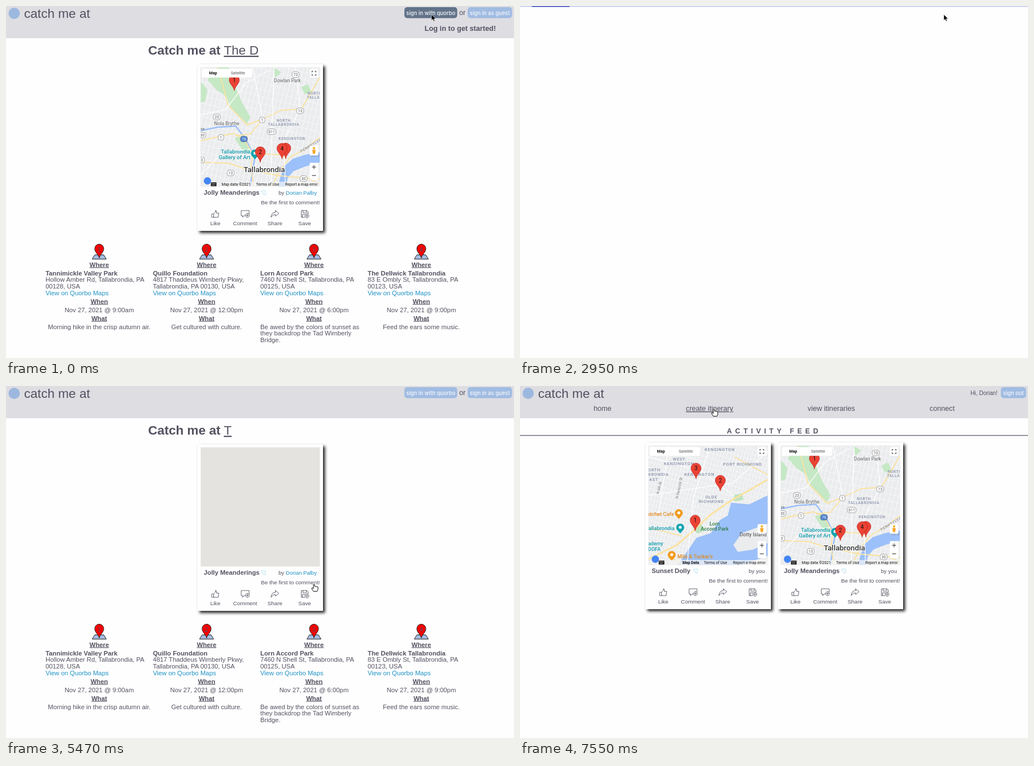
An HTML page that plays this animation: 899x623 px, repeating every 8 s.

```html
<!DOCTYPE html>
<html lang="en">
<head>
<meta charset="utf-8">
<title>catch me at</title>
<style>
html, body { margin: 0; width: 100%; height: 100%; overflow: hidden; background: #fefefe; }
svg { display: block; width: 899px; height: 623px; font-family: "Liberation Sans", Arial, sans-serif; fill: #545160; }
text { white-space: pre; }
.b { font-weight: 700; }
.med { font-weight: 500; }
.mid { text-anchor: middle; }
.end { text-anchor: end; }
.u { text-decoration: underline; }
.link { fill: #1f92c5; }
.ui { font-family: Inter, sans-serif; font-weight: 500; fill: #f6f8fc; text-anchor: middle; }
.rob { font-family: Roboto, sans-serif; }
.area { font-family: Roboto, sans-serif; fill: #8791a9; font-weight: 500; letter-spacing: .7px; }
.icon { fill: none; stroke: #555260; stroke-width: .9; stroke-linejoin: round; stroke-linecap: round; }
.hwy { fill: none; stroke: #fae3a0; stroke-linejoin: round; }
.road { fill: none; stroke: #fff; stroke-width: 1.3; }
.water { fill: #9cc0f9; }
</style>
</head>
<body>
<svg id="stage" viewBox="0 0 899 623" xmlns="http://www.w3.org/2000/svg"></svg>
<script>
const txt = (x, y, s, size = 11.3, cls = '', attr = '') =>
  `<text x="${x}" y="${y}" font-size="${size}" class="${cls}" ${attr}>${s}</text>`;
const rect = (x, y, w, h, fill, attr = '') =>
  `<rect x="${x}" y="${y}" width="${w}" height="${h}" fill="${fill}" ${attr}/>`;
const dot = (x, y, r, fill) => `<circle cx="${x}" cy="${y}" r="${r}" fill="${fill}"/>`;
const path = (d, attr = '') => `<path d="${d}" ${attr}/>`;
const at = (x, y, body, attr = '') => `<g transform="translate(${x} ${y})" ${attr}>${body}</g>`;
const hline = (x1, x2, y, color) => path(`M${x1} ${y}H${x2}`, `stroke="${color}"`);

const LIGHT = '#a1bce2', SLATE = '#627389';
const button = (x, w, label, id = '') =>
  rect(x, 2, w, 19.5, LIGHT, `rx="5" ${id && `id="${id}"`}`) + txt(x + w / 2, 15.5, label, 9.5, 'ui');

// Map parts, in map coordinates (211 x 211)
const LAND = '#ebecee';
const mapPin = (x, y, n) => at(x, y,
  path('M0 19C-1 11-9 7-9 0A9 9 0 0 1 9 0C9 7 1 11 0 19Z', 'fill="#ea4335" stroke="#b31412" stroke-width=".6"') +
  txt(0, 3.6, n, 10, 'rob mid', 'fill="#111"'));
const spot = (x, y, fill) => at(x, y,
  path('M0 11L-6 4A7 7 0 1 1 6 4Z', `fill="${fill}"`) + dot(0, 0, 2.6, '#fff'));
const shield = (x, y, n, fill = '#fff', ink = '#555') => {
  const w = 7 + String(n).length * 2.8;
  return rect(x - w / 2, y - 5, w, 10, fill, 'rx="4" stroke="#8b8b8b" stroke-width=".8"') +
    txt(x, y + 2.4, n, 6.8, 'rob mid', `fill="${ink}"`);
};
const streets = (id, size, angle) =>
  `<pattern id="${id}" width="${size}" height="${size * 1.5}" patternUnits="userSpaceOnUse" patternTransform="rotate(${angle})">` +
  path(`M0 0H${size}M0 0V${size * 1.5}`, 'stroke="#fff" stroke-width="1.2"') + '</pattern>';

const controls = (credit, creditX, cls) =>
  rect(2, 2.5, 89, 15.5, '#fff', 'rx="1.5"') +
  txt(22, 12.8, 'Map', 7, 'rob mid b', 'fill="#111"') + txt(66, 12.8, 'Satellite', 7, 'rob mid', 'fill="#555"') +
  rect(193, 3, 15, 15, '#fff', 'rx="1.5"') +
  path('M197 9V7H199M202 7H204V9M204 12V14H202M199 14H197V12', 'fill="none" stroke="#666" stroke-width="1.3"') +
  rect(193, 139, 15, 17, '#fff', 'rx="1.5"') + dot(200.5, 143, 2.2, '#f6b73c') +
  path('M197.5 146H203.5L202.5 153H198.5Z', 'fill="#f6a623"') +
  rect(193, 169, 15, 30, '#fff', 'rx="1.5"') +
  path('M197 176.5H204M200.5 173V180M197 191.5H204', 'stroke="#666" stroke-width="1.4"') +
  dot(12, 201, 6.5, '#4285f4') +
  rect(36, 202.5, 175, 8.5, '#f5f5f5', 'opacity=".7"') +
  rect(18, 203.5, 10, 7, '#222', 'rx="1"') +
  path('M19.5 205.5H26.5M20.5 208.5H25.5', 'stroke="#fff" stroke-dasharray="1 .7"') +
  txt(creditX, 209.5, credit, 6.9, 'rob ' + cls, 'fill="#111"') +
  txt(98, 209.5, 'Terms of Use', 6.9, 'rob', 'fill="#111"') +
  txt(207, 209.5, 'Report a map error', 6.9, 'rob end', 'fill="#111"');

const cityMap = () =>
  rect(0, 0, 211, 211, LAND) + rect(0, 0, 211, 211, 'url(#blocks)') +
  path('M12 22L30 0H50L63 38 73 62 88 88 82 100 66 84 54 74 46 52 28 40ZM0 25L12 40 8 60 0 63ZM128 0L143 9 132 18ZM60 125L78 120 90 146 76 150ZM178 35L190 30 196 44 184 48Z', 'fill="#c5e8c5"') +
  path('M0 112L30 106 62 104 80 128 88 144 96 158 93 176 88 211', 'fill="none" stroke="#9cc0f9" stroke-width="2.5"') +
  path('M211 150L184 155 163 162 148 175 141 194 137 211H151L154 196 164 184 184 176 211 168Z', 'class="water"') +
  path('M0 130L34 122 58 117 76 126 92 153 89 178 94 211M126 211L140 182 160 158 186 144 211 124M92 152L140 155 152 162M30 0L41 38 48 66 82 102 109 92 143 76 178 74 211 18M0 168L50 170 80 180 140 192 211 198M109 92L88 118 62 121M211 206L180 192', 'class="hwy" stroke-width="1.9"') +
  path('M0 84L44 75 80 28 120 6M125 211L126 113 130 0M150 211L147 130 176 74 168 0M92 0L110 92M0 190L40 150 88 145', 'class="road"') +
  txt(153.5, 26.5, 'Dowlan Park', 8.6, 'rob mid', 'fill="#6b6b6b"') +
  txt(189, 48, 'NORTH', 6.5, 'area') + txt(188, 55, 'TALLABRONDIA', 6.5, 'area') +
  txt(147, 96.5, 'NORTH', 6.5, 'area mid') + txt(147, 103.5, 'TALLABRONDIA', 6.5, 'area mid') +
  txt(161.5, 128, 'KENSINGTON', 6.5, 'area mid') +
  txt(46, 102.5, 'Nola Brythe', 8.6, 'rob mid', 'fill="#6b6b6b"') +
  txt(0, 111, 're', 8, 'rob', 'fill="#6b6b6b"') +
  txt(0, 0, 'PENNSYLVANIA', 6.5, 'area', 'transform="translate(178 151) rotate(-31)"') +
  txt(195, 158, 'NEW', 6.5, 'area') +
  shield(168, 13, 73) + shield(176, 77, 13) + shield(28.5, 88, 23) + shield(109, 93, 1) + shield(125.5, 114, 611) +
  shield(36, 124, 1) + shield(76.5, 127, 76, '#4a7fcb', '#fff') + shield(3, 120, 30) + shield(53, 187, 13) +
  shield(2, 164, 3) + shield(182, 197, 30) +
  txt(88, 152.5, 'Tallabrondia', 9.5, 'rob end med', 'fill="#129eaf"') +
  txt(88, 162, 'Gallery of Art', 9.5, 'rob end med', 'fill="#129eaf"') + spot(96, 152, '#12a4af') +
  txt(112.5, 185.5, 'Tallabrondia', 13.3, 'rob mid med', 'fill="#333" stroke="#fff" stroke-width="2" paint-order="stroke"') +
  mapPin(59.5, 22.5, 1) + mapPin(105.5, 149.5, 2) + mapPin(150.5, 143, '') + mapPin(144, 143.5, 4) +
  controls('Map data ©2021', 37, '');

const townMap = () =>
  rect(0, 0, 211, 211, LAND) + rect(0, 0, 211, 211, 'url(#lanes)') +
  path('M52 211L85 163 110 155 126 132 140 124 146 101 178 104 211 88V195L165 211Z', 'class="water"') +
  path('M211 138L165 155 150 176 158 188 185 184 211 172Z', `fill="${LAND}"`) +
  path('M80 145L92 136 100 150 86 156ZM150 88L166 84 168 96 152 99Z', 'fill="#bfe3c0"') +
  path('M0 201L50 176 82 148 110 122 145 98 211 60', 'class="hwy" stroke-width="3"') +
  path('M0 145L60 160M152 20L211 52M36 195L60 211', 'class="hwy" stroke-width="1.9"') +
  path('M0 88L150 66 211 10M68 211L80 90 110 0M36 0L18 120M0 20L96 46 152 90', 'class="road"') +
  txt(126, 9.5, 'KENSINGTON', 7.5, 'area mid') +
  txt(54, 26, 'WEST', 7.5, 'area mid') + txt(54, 34.5, 'KENSINGTON', 7.5, 'area mid') +
  txt(132, 35.5, 'PORT RICHMOND', 7.5, 'area') + txt(90, 53.5, 'KENSINGTON', 7.5, 'area mid') +
  txt(-1, 45.5, 'ORTH', 7.5, 'area') + txt(-1, 53.5, 'BRONDIA', 7.5, 'area') + txt(1, 62, 'AST', 7.5, 'area') +
  txt(111, 93.5, 'OLDE', 7.5, 'area mid') + txt(111, 101.5, 'RICHMOND', 7.5, 'area mid') +
  txt(0, 0, 'N 6th St', 6.3, 'rob', 'transform="translate(18 86) rotate(-76)" fill="#777"') +
  txt(0, 0, 'N Hancock St', 6.3, 'rob', 'transform="translate(52 94) rotate(-78)" fill="#777"') +
  txt(45, 124, 'Hatchet Cafe', 9.3, 'rob end med', 'fill="#e08a1e"') + spot(53.5, 119, '#f29b1d') +
  txt(46, 149.5, 'Tallabrondia', 9.3, 'rob end med', 'fill="#129eaf"') + spot(56, 144.5, '#12a4af') +
  txt(117, 141, 'Lorn', 9, 'rob mid med', 'fill="#2f7d4a"') + txt(117, 150.5, 'Accord Park', 9, 'rob mid med', 'fill="#2f7d4a"') +
  txt(185, 160.5, 'Dotty Island', 9, 'rob mid', 'fill="#444"') +
  txt(-1, 176, 'ademy', 9, 'rob med', 'fill="#129eaf"') + txt(-1, 186, 'DOFA', 9, 'rob med', 'fill="#129eaf"') +
  spot(41, 193, '#f29b1d') + txt(51, 199.5, 'Milo &amp; Tucker\'s', 9.3, 'rob med', 'fill="#e08a1e"') +
  mapPin(84, 40, 3) + mapPin(127, 61.5, 2) + mapPin(82.5, 132, 1) +
  controls('Map Data', 60, 'b');

const actions = [
  ['Like', 'M-6 0H-3V6H-6ZM-3 0L0-3V-6Q2-7 2-4V-1.5H6L5 6H-3'],
  ['Comment', 'M0 3H-2L-4.5 6V3H-7V-6H7V0M4-1A3.5 3.5 0 1 0 4.1-1M4 .8V4.2M2.3 2.5H5.7'],
  ['Share', 'M1-6L7-1 1 4V1Q-4 1-7 6Q-6-3 1-3Z'],
  ['Save', 'M0 6H-6V-6H4L6-4V0M-3-6V-2H3V-6M-4 6V1H1M4 0A3.5 3.5 0 1 0 4.1 0M4 1.8V5.2M2.3 3.5H5.7']
];
const card = (x, y, title, tagX, by, map) => at(x, y,
  rect(0, 0, 222, 295, '#fefefe', 'filter="url(#shadow)"') + rect(5.5, 5.5, 211, 211, '#e4e3df') +
  at(5.5, 5.5, map, 'class="map" clip-path="url(#mapClip)"') +
  txt(11, 231, title, 11.3, 'b') +
  path(`M${tagX} 224H${tagX + 7}V231H${tagX + 4}L${tagX + 3} 228 ${tagX} 226Z`, 'fill="none" stroke="#a9dbef" stroke-width=".8"') +
  txt(211, 230.5, by, 9.6, 'end') + txt(216.5, 247.5, 'Be the first to comment!', 9.9, 'end') +
  actions.map(([label, d], i) => at(31.5 + i * 52.7, 265, path(d, 'class="icon"') + txt(0, 20, label, 9.9, 'mid'))).join(''));

const stops = [
  ['Tannimickle Valley Park', 'Hollow Amber Rd, Tallabrondia, PA', '00128, USA', '9:00am', ['Morning hike in the crisp autumn air.']],
  ['Quillo Foundation', '4817 Thaddeus Wimberly Pkwy,', 'Tallabrondia, PA 00130, USA', '12:00pm', ['Get cultured with culture.']],
  ['Lorn Accord Park', '7460 N Shell St, Tallabrondia, PA', '00125, USA', '6:00pm',
    ['Be awed by the colors of sunset as', 'they backdrop the Tad Wimberly', 'Bridge.']],
  ['The Dellwick Tallabrondia', '83 E Ombly St, Tallabrondia, PA', '00123, USA', '9:00pm', ['Feed the ears some music.']]
];
const stop = ([name, street, zip, time, what], i) => at(70 + i * 190, 0,
  path('M82.5 448L87 440.5H103L107.5 448Z', 'fill="#a5bce2" stroke="#222"') +
  path('M95 446C94 440 87 436 87 429.5A8 8 0 0 1 103 429.5C103 436 96 440 95 446Z', 'fill="#f70000" stroke="#222"') +
  txt(95, 434.5, i + 1, 11.3, 'mid') +
  txt(95, 461.5, 'Where', 11.3, 'b u mid') + txt(0, 476.5, name, 11.3, 'b') +
  txt(0, 488, street) + txt(0, 500, zip) + txt(0, 511.5, 'View on Quorbo Maps', 11.3, 'link') +
  txt(95, 526.5, 'When', 11.3, 'b u mid') + txt(95, 541.5, `Nov 27, 2021 @ ${time}`, 11.3, 'mid') +
  txt(95, 556.5, 'What', 11.3, 'b u mid') +
  what.map((line, n) => what.length > 1 ? txt(0, 571.5 + n * 11.7, line) : txt(95, 571.5, line, 11.3, 'mid')).join(''));

const header = rect(0, 0, 899, 57, '#dddde2') + dot(14.5, 13, 10, '#9db8df') + txt(32, 20.5, 'catch me at', 22.6);

const home = header + button(705, 93.5, 'sign in with quorbo', 'signIn') + txt(802, 16, 'or', 12.7) +
  button(817, 78.5, 'sign in as guest') +
  txt(867, 44, 'Log in to get started!', 12.7, 'b end', 'id="hint"') +
  txt(251.5, 86, 'Catch me at', 22.6, 'b') + txt(385.5, 86, '', 22.6, 'u', 'id="typed"') +
  card(339, 103, 'Jolly Meanderings', 113, 'by <tspan class="link">Dorian Palby</tspan>', cityMap()) + stops.map(stop).join('');

const feed = header + txt(845, 15.5, 'Hi, Dorian!', 10.1, 'end') + button(851, 44.5, 'sign out') +
  txt(146, 44, 'home', 12.7, 'mid') + txt(335.5, 44, 'create itinerary', 12.7, 'mid', 'id="create"') +
  txt(551, 44, 'view itineraries', 12.7, 'mid') + txt(747, 44, 'connect', 12.7, 'mid') +
  txt(366, 83.5, 'ACTIVITY FEED', 12.4, 'b', 'letter-spacing="5.75"') + rect(0, 86.8, 899, 1.5, '#716e7c') +
  card(222, 100, 'Sunset Dolly', 85, 'by you', townMap()) + card(456, 100, 'Jolly Meanderings', 113, 'by you', cityMap());

const accounts = [
  ['Dorian Palby', 'dorpalmusic@example.com', '#f4511e'],
  ['Dorian Palby', 'dorianpalb@example.com', '#ab47bc'],
  ['Noreena McBexly', 'noreenambexl@example.com', '#33691e']
];
const account = ([name, mail, color], i) => at(0, i * 43,
  dot(330, 282, 10, color) + txt(330, 286, name[0], 11, 'rob mid', 'fill="#fff"') +
  txt(348.5, 279.5, name, 10.6, 'rob med', 'fill="#3c4043"') + txt(348.5, 292, mail, 8.5, 'rob', 'fill="#5f6368"') +
  hline(320, 579, 303.5, '#dadce0'));

const chooser = rect(291.5, 136.5, 316.5, 386.5, '#fff', 'rx="5" stroke="#d5d7da"') +
  `<g id="bar">${rect(292, 137, 316, 2.5, '#e4e6e9')}${rect(292, 137, 10, 2.5, '#9ec0f5', 'id="barFill"')}</g>` +
  '<g id="choices">' + rect(292, 261, 316, 42.5, '#f5f5f5', 'id="rowHover"') +
  dot(308, 149.5, 4.7, '#4285f4') + txt(321.5, 154, 'Sign in with Quorbo', 10, 'rob', 'fill="#5f6368"') +
  hline(292, 608, 161.5, '#dadce0') +
  txt(449.5, 216, 'Choose an account', 17.4, 'rob mid', 'fill="#202124"') +
  txt(449.5, 239.5, 'to continue to <tspan class="med" fill="#1a73e8">catch-me-at.firebaseapp.com</tspan>', 11.5, 'rob mid', 'fill="#202124"') +
  accounts.map(account).join('') + txt(579, 364, 'Signed out', 8.5, 'rob end', 'fill="#5f6368"') +
  '<g fill="none" stroke="#5f6368"><circle cx="330" cy="406.5" r="5.5"/><circle cx="330" cy="405" r="1.8"/><path d="M326 410Q330 406.5 334 410"/></g>' +
  txt(348.5, 410, 'Use another account', 10.6, 'rob med', 'fill="#3c4043"') + hline(320, 579, 423.5, '#dadce0') +
  ['To continue, Quorbo will share your name, email address,', 'language preference, and profile picture with catch-me-', 'at.firebaseapp.com.']
    .map((line, i) => txt(320.5, 464 + i * 14, line, 10, 'rob', 'fill="#5f6368"')).join('') + '</g>' +
  txt(292, 549, 'English (United States)', 8.2, 'rob', 'fill="#202124"') + path('M383 544.5H389L386 547.5Z', 'fill="#444"') +
  txt(493, 549, 'Help', 8.4, 'rob med', 'fill="#666"') + txt(533, 549, 'Privacy', 8.4, 'rob med', 'fill="#666"') +
  txt(607, 549, 'Terms', 8.4, 'rob end med', 'fill="#666"');

const loader = rect(0, 0, 899, 1.5, '#c1c8ef') + rect(0, 0, 0, 1.5, '#3a4cc0', 'id="loadFill"');

const scenes = { home, feed, chooser, loader };
const $ = id => document.getElementById(id);
$('stage').innerHTML =
  '<defs><filter id="shadow" x="-10%" y="-10%" width="125%" height="125%"><feDropShadow dx="3.5" dy="3.5" stdDeviation="2.8" flood-color="#222"/></filter>' +
  `<clipPath id="mapClip">${rect(0, 0, 211, 211, '#000')}</clipPath>${streets('blocks', 8, 14)}${streets('lanes', 6, 16)}</defs>` +
  rect(0, 0, 899, 623, '#fefefe') +
  Object.entries(scenes).map(([id, body]) => `<g id="${id}">${body}</g>`).join('') +
  '<g id="cursor" stroke-linejoin="round">' +
  path('M0 0V10.5L2.4 8.3 4 12 5.8 11.2 4.2 7.7H7.6Z', 'id="arrow" fill="#000" stroke="#fff" stroke-width=".6"') +
  path('M-1 1V7.5L-3 6-4.3 7.2-.8 12.5H5.5L7 9V4.5L5 4 1.2 3.6V.7Q0-.6-1 1Z', 'id="hand" fill="#fff" stroke="#111"') + '</g>';

const LOOP = 8000, STEP = 148.2;
const trail = [
  [0, 753, 15], [140, 753, 15], [730, 750, 15], [2960, 750, 15], [3400, 667, 250], [3720, 667, 250], [4290, 418, 279],
  [5180, 418, 279], [5475, 545, 351], [6216, 710, 336], [6810, 450, 150], [6860, 450, 150], [7540, 343, 41]
];
const pointerAt = t => {
  const i = trail.findIndex(p => p[0] > t);
  if (i < 0) return trail.at(-1).slice(1);
  const [t0, x0, y0] = trail[i - 1], [t1, x1, y1] = trail[i];
  const k = (t - t0) / (t1 - t0), ease = k * k * (3 - 2 * k);
  return [x0 + (x1 - x0) * ease, y0 + (y1 - y0) * ease];
};
const typedAt = t => {
  if (t < 1610) return 'The Dellwick'.slice(0, 5 + Math.floor(t / 98));
  if (t < 4000) return 'Lorn Accord Park'.slice(0, 1 + Math.floor((t - 1610) / 100));
  return 'The Dellwick'.slice(0, 1 + Math.max(0, Math.floor((t - 5460) / 100)));
};
const sceneAt = t =>
  t < 2800 ? 'home' : t < 3245 ? 'loader' : t < 5170 ? 'chooser' : t < 5460 ? 'loader' : t < 5910 ? 'home' : 'feed';
const show = (el, on) => { el.style.display = on ? '' : 'none'; };
const maps = document.querySelectorAll('.map');

function draw(time) {
  const t = time < 135 ? 0 : 140 + STEP * Math.floor((time - 130) / STEP);
  const scene = sceneAt(t);
  Object.keys(scenes).forEach(id => show($(id), id === scene));

  const guest = t < 2800;
  $('typed').textContent = typedAt(t);
  $('signIn').setAttribute('fill', guest && t < 2500 ? SLATE : LIGHT);
  show($('hint'), guest);
  maps.forEach(map => show(map, guest || t > 6500));

  const leaving = t > 4580;
  const [x, y] = pointerAt(t);
  const onRow = scene === 'chooser' && !leaving && x < 608 && y > 261;
  $('choices').setAttribute('opacity', leaving ? .5 : 1);
  show($('rowHover'), onRow);
  show($('bar'), leaving);
  $('barFill').setAttribute('width', Math.min(316, Math.max(0, 10 + (t - 4734) * .5)));

  const sweep = t < 4000 ? t - 2956 : t - 5326;
  $('loadFill').setAttribute('x', 21 + sweep * .9);
  $('loadFill').setAttribute('width', Math.max(0, 67 + sweep * .6));

  const onLink = scene === 'feed' && y < 48 && x < 378;
  $('create').classList.toggle('u', onLink);
  const hand = onRow || onLink || (scene === 'home' && !guest && x < 561);
  show($('hand'), hand);
  show($('arrow'), !hand);
  $('cursor').setAttribute('transform', `translate(${x} ${y})`);
}

const start = performance.now();
function tick() {
  draw((performance.now() - start) % LOOP);
  requestAnimationFrame(tick);
}
tick();
</script>
</body>
</html>
```
